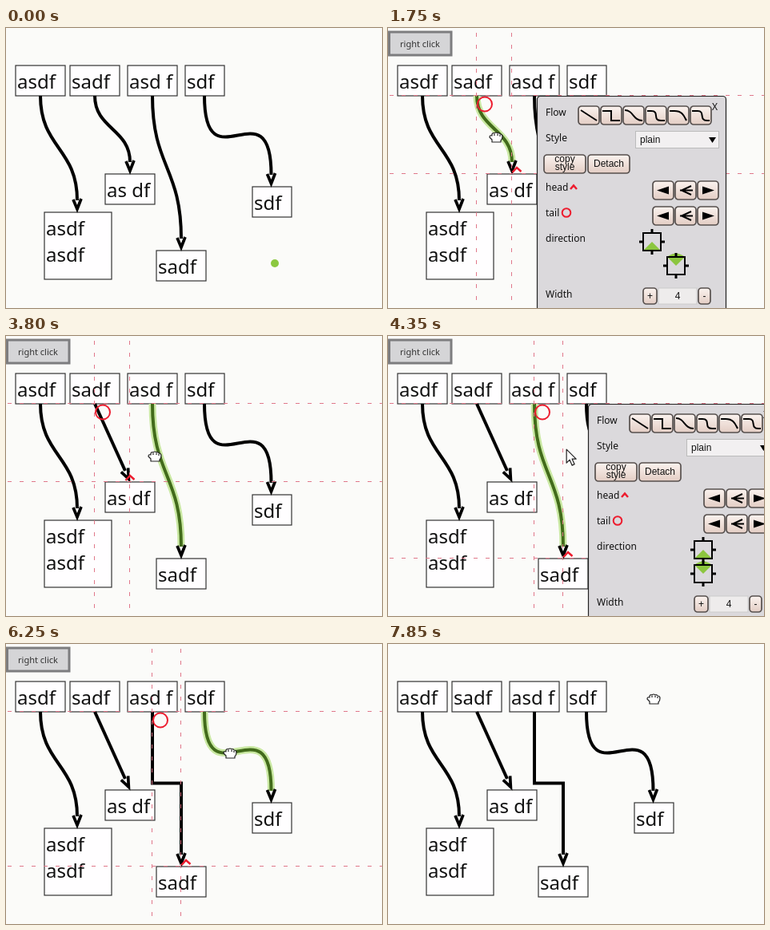
Animation, 470 px wide and 351 px high, one loop 8 s. Source, as an HTML page:

```html
<!DOCTYPE html>
<html lang="en">
<head>
<meta charset="utf-8">
<title>Link styles</title>
<style>
html, body { margin: 0; width: 100%; height: 100%; overflow: hidden; background: #fbfbf9; }
svg { display: block; width: 470px; height: 351px; }
text { font: 12px "Noto Sans", "Open Sans", sans-serif; fill: #111; white-space: pre; }
.node { font-size: 24px; }
.ui { font: 12px "Liberation Sans", Arial, sans-serif; }
.mid { text-anchor: middle; }
.line { fill: none; stroke: #000; stroke-width: 4; }
.thin { fill: none; stroke: #000; stroke-width: 2; }
.red { fill: none; stroke: #ed1c2e; stroke-width: 2; }
.guide { stroke: #e0788a; stroke-width: 1; stroke-dasharray: 5 10; }
</style>
</head>
<body>
<svg viewBox="0 0 470 351">
  <defs>
    <linearGradient id="face" x2="0" y2="1">
      <stop stop-color="#fbf3ef"/><stop offset="1" stop-color="#e3cdc4"/>
    </linearGradient>
    <linearGradient id="pressed" x2="0" y2="1">
      <stop stop-color="#e6cbbf"/><stop offset="1" stop-color="#f5e2d9"/>
    </linearGradient>
  </defs>
  <g id="scene"></g>
</svg>
<script>
const LOOP = 8000;
const scene = document.getElementById('scene');

const nodes = [
  [12, 47, 62, 38, 'asdf'], [80, 47, 62, 38, 'sadf'], [152, 47, 62, 38, 'asd f'], [224, 47, 49, 38, 'sdf'],
  [124, 183, 62, 38, 'as df'], [48, 231, 84, 84, 'asdf', 'asdf'], [188, 279, 62, 38, 'sadf'], [308, 199, 49, 38, 'sdf']
];

// start x, end x, end y, optional curve handle length
const links = [[43, 89, 231], [111, 155, 183], [183, 219, 279], [248, 331.5, 199, 115]];
const TOP = 85, HEAD = 15;

// time, x, y
const moves = [
  [600, 42, 300], [900, 133, 151], [1050, 179, 138], [1250, 132, 127], [1450, 132, 127], [1500, 135, 137],
  [2200, 135, 137], [2650, 258, 111], [3000, 258, 111], [3800, 186, 151],
  [4250, 186, 151], [4600, 316, 120], [4700, 316, 120], [4850, 347, 111],
  [5600, 347, 111], [6050, 309, 127], [6150, 309, 127], [6250, 280, 137],
  [7100, 280, 137], [7400, 339, 88], [7550, 332, 69]
];

const within = (t, a, b) => t >= a && t < b;
const label = (x, y, s, cls = '') => `<text x="${x}" y="${y}" class="${cls}">${s}</text>`;
const path = (d, cls, more = '') => `<path d="${d}" class="${cls}" ${more}/>`;
const ring = (x, y, r) => `<circle cx="${x}" cy="${y}" r="${r}" class="red"/>`;
const dot = (x, y) => `<circle cx="${x}" cy="${y}" r="5" fill="#8cc840"/>`;
const rect = (x, y, w, h, fill, stroke, sw = 1, r = 0) =>
  `<rect x="${x}" y="${y}" width="${w}" height="${h}" rx="${r}" fill="${fill}" stroke="${stroke}" stroke-width="${sw}"/>`;
const at = (x, y, s) => `<g transform="translate(${x} ${y})">${s}</g>`;
const button = (x, y, w, h, down) =>
  rect(x + 1, y + 1, w - 2, h - 2, `url(#${down ? 'pressed' : 'face'})`, down ? '#332f2e' : '#57504e', 1.7, 4);

function drawNode([x, y, w, h, ...lines]) {
  return rect(x, y, w, h, '#fffeff', '#333', 1.2) +
    lines.map((s, i) => label(x + 2, y + 29 + 33 * i, s, 'node')).join('');
}

function drawLink(i, kind, hover) {
  const [x, ex, ey, grip] = links[i];
  const by = ey - HEAD, my = (TOP + by) / 2, L = grip || (by - TOP) / 2;
  const straight = kind === 'straight';
  const angle = straight ? Math.atan2(x - ex, ey - TOP) * 180 / Math.PI : 0;
  const d = straight ? `M${x} ${TOP}L${ex - 6} ${by + 1}`
    : kind === 'step' ? `M${x} ${TOP}V${my}H${ex}V${by}`
    : `M${x} ${TOP}C${x} ${TOP + L} ${ex} ${by - L} ${ex} ${by}`;
  const halo = hover ? path(d, 'line', 'style="stroke:#c9e8a2;stroke-width:9"') : '';
  const head = `<g transform="translate(${ex} ${ey}) rotate(${angle})">` +
    path('M-5-16L0-4L5-17', 'line', 'style="stroke-width:3.7"') + '</g>';
  return halo + path(d, 'line', hover ? 'style="stroke:#426b1b"' : '') + head;
}

function drawGuides(i, straight) {
  const [x, ex, ey] = links[i];
  const cx = ex + (straight ? -6 : 0);
  return [x, ex].map(v => path(`M${v - .5} 6V345`, 'guide')).join('') +
    [TOP, ey].map(v => path(`M2 ${v - .5}H470`, 'guide')).join('') +
    ring(x + 10, TOP + 10.5, 9) +
    path(`M${cx + .5} ${ey - 2}l5.5-6l5.5 5`, 'red', 'style="stroke-width:2.5"');
}

const flows = ['M4 6L24 19', 'M3 7H14V19H25', 'M3 6C14 6 13 19 25 19', 'M3 7H8C19 7 9 19 20 19H25',
  'M3 7H9C19 7 21 13 24 19', 'M3 7H10C20 7 11 19 22 19H25'];
const solidTip = 'M6 12.5L21 7.5V17.5Z';

function headButtons(y) {
  const icons = [
    path(solidTip, ''),
    path('M21 7L9 12.5L21 18M7 12.5H23', 'thin'),
    path(solidTip, '', 'transform="matrix(-1 0 0 1 28 0)"')
  ];
  return icons.map((icon, i) => at(144 + 28 * i, y, button(0, 0, 28, 25) + icon)).join('');
}

function port(x, y, up) {
  const green = up ? 'M-11 11L0 0L11 11Z' : 'M-11-11Q0-20 11-11L0 0Z';
  return at(x, y, path(green, '', 'style="fill:#8cc63f"') +
    path('M-11-11H11V11H-11Z', 'thin') +
    path('M0-16V-11M0 11V16M-16 0H-11M11 0H16', 'thin', 'style="stroke-width:3"'));
}

function drawPanel(x, pick, down, secondPort) {
  let s = rect(.5, .5, 236, 280, '#dbd9dc', '#222', 1.2, 4);
  [['Flow', 25], ['Style', 57], ['head', 119], ['tail', 151], ['direction', 183], ['Width', 253]]
    .forEach(([name, y]) => s += label(11, y, name));
  s += label(219, 18, 'X');
  flows.forEach((d, i) => s += at(51 + 28 * i, 12,
    button(0, 0, 28, 25, down && i === pick) + path(d, 'thin')));
  s += rect(123.5, 44.5, 104, 21, '#f2f0f1', '#bbb') + label(129, 59, 'plain', 'ui') +
    path('M215 52H224L219.5 59Z', '');
  s += button(8, 73, 54, 25) + label(35, 83, 'copy', 'ui mid') + label(35, 93, 'style', 'ui mid');
  s += button(63, 73, 54, 25) + label(90, 89, 'Detach', 'ui mid');
  s += path('M42 117L46 112.5L50 117', 'red', 'style="stroke-width:2.5"') + ring(37, 146.5, 5.3);
  s += headButtons(106) + headButtons(138);
  s += port(144, 183, true) + port(secondPort, 213, false);
  s += button(132, 240, 19, 22) + label(141.5, 255, '+', 'ui mid');
  s += rect(152, 241, 48, 20, '#eeecec', '#ccc') + label(176, 255, '4', 'ui mid');
  s += button(201, 240, 17, 22) + label(209.5, 255, '-', 'ui mid');
  return at(x, TOP, s);
}

function drawBadge(t) {
  const name = within(t, 6500, LOOP) ? 'left click' : 'right click';
  return `<g opacity="${t < 7800 ? 1 : .4}">` + rect(1.5, 5, 77.5, 29, '#d5d5d7', '#7d7d7f', 3) +
    `<text x="40" y="24" class="mid" style="font-size:11px;fill:#333">${name}</text></g>`;
}

function drawCursor(t) {
  if (t < moves[0][0]) return '';
  let i = moves.findIndex(m => m[0] > t);
  if (i < 0) i = moves.length;
  const a = moves[i - 1], b = moves[i] || a;
  const k = b === a ? 0 : (t - a[0]) / (b[0] - a[0]);
  const x = a[1] + (b[1] - a[1]) * k, y = a[2] + (b[2] - a[2]) * k;
  const fist = within(t, 1500, 2200) || within(t, 3700, 4300) || t >= 6200;
  const shape = fist
    ? 'M-5 6V3L-8 0Q-8-3-5-2V-4Q-4-6-2-5Q0-7 2-5Q4-6 5-4Q8-4 8-1Q8 2 6 4V6Z M-2-4V-2M2-4V-2M5-3V-1'
    : 'M0 0V17L4 13L7 20L10 18.5L7 12H12Z';
  return at(x, y, path(shape, '', 'fill="#fff" stroke="#222" stroke-width="1.2" stroke-linejoin="round"'));
}

function draw(t) {
  const kinds = ['curve', t >= 3000 ? 'straight' : 'curve', t >= 5450 ? 'step' : 'curve', 'curve'];
  const hover = [false,
    within(t, 950, 1050) || within(t, 1150, 2250),
    within(t, 2400, 4400),
    within(t, 5850, 7250)];
  const chosen = within(t, 1750, 4300) ? 1 : within(t, 4300, 6500) ? 2 : within(t, 6500, 6750) ? 3 : 0;

  let s = nodes.map(drawNode).join('') + links.map((_, i) => drawLink(i, kinds[i], hover[i])).join('');
  if (t < 1750) s += dot(336, 295);
  if (within(t, 6750, 7800)) s += dot(331, 200);
  if (chosen) s += drawGuides(chosen, kinds[chosen] === 'straight');
  if (within(t, 1750, 7850)) s += drawBadge(t);
  if (within(t, 1750, 3000)) s += drawPanel(186, 0, t >= 2850, 174);
  if (within(t, 4300, 5450)) s += drawPanel(250, 1, t >= 5300, 144);
  return s + drawCursor(t);
}

let shown = -1;
const start = performance.now();
function tick() {
  const t = Math.floor((performance.now() - start) % LOOP / 50) * 50;
  if (t !== shown) scene.innerHTML = draw(shown = t);
  requestAnimationFrame(tick);
}
tick();
</script>
</body>
</html>
```
